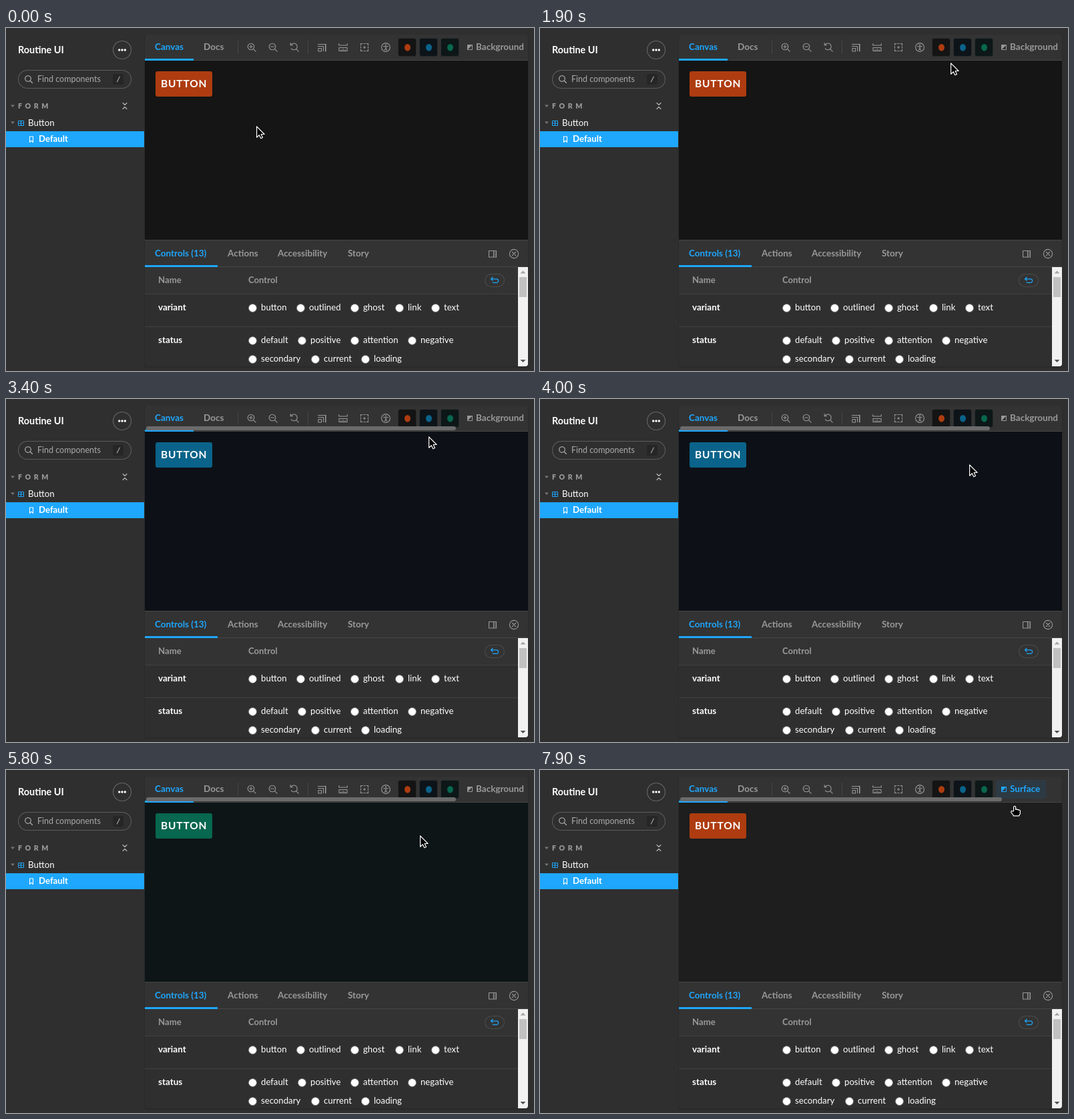
An HTML page that plays this animation: 791 px wide and 515 px high, repeating every 8000 ms.

```html
<!DOCTYPE html>
<html lang="en">
<head>
<meta charset="utf-8">
<title>Component workbench</title>
<style>
  html, body { margin: 0; width: 100%; height: 100%; overflow: hidden; background: #2f2f2f; }
  svg { display: block; width: 791px; height: 515px; }
  text { font: 13.2px Lato, "Open Sans", sans-serif; fill: #fff; white-space: pre; }
  .b { font-weight: 700; font-size: 13.5px; }
  .g { fill: #999; }
  .a { fill: #1ea7fd; }
  .i { fill: none; stroke: #999; stroke-width: 1.1; stroke-linecap: round; stroke-linejoin: round; }
  .ia { fill: none; stroke: #1ea7fd; stroke-width: 1.2; }
  .line { fill: #464646; }
  .cur { fill: #000; stroke: #fff; stroke-width: 1.2; stroke-linejoin: round; }
</style>
</head>
<body>
<svg viewBox="0 0 791 515">
  <rect width="791" height="515" fill="#2f2f2f"/>

  <!-- sidebar -->
  <text class="b" x="18" y="38" style="font-size:14.4px">Routine UI</text>
  <circle class="i" cx="174" cy="33" r="13.5" style="stroke:#666"/>
  <g fill="#fff"><circle cx="169.7" cy="33" r="1.7"/><circle cx="174" cy="33" r="1.7"/><circle cx="178.3" cy="33" r="1.7"/></g>
  <rect class="i" x="18.5" y="63.5" width="169" height="27" rx="13.5" style="stroke:#5c5c5c"/>
  <g class="i" style="stroke:#bbb"><circle cx="33" cy="76" r="4.3"/><path d="M36.2 79.2l3.3 3.3"/></g>
  <text x="47" y="81" style="font-size:12.5px;fill:#aaa">Find components</text>
  <rect x="160" y="69" width="16" height="16" rx="3" fill="#262626"/>
  <path class="i" d="M166.3 81l4-8" style="stroke:#aaa"/>
  <g fill="#777"><path d="M7 115.5h6l-3 3.5z"/><path d="M7 140.5h6l-3 3.5z"/></g>
  <text class="g" x="18" y="121" style="font-size:10.6px;font-weight:900;letter-spacing:4.6px">FORM</text>
  <path class="i" d="M175 112.5l3 3 3-3M175 121.5l3-3 3 3" style="stroke:#bbb"/>
  <path class="ia" d="M18.5 139.5h8v7h-8zM22.5 139.5v7M18.5 143h8" style="stroke-width:1"/>
  <text x="33" y="147">Button</text>
  <rect y="155" width="208" height="24" fill="#1ea7fd"/>
  <path class="i" d="M35.5 163h5v8.5l-2.5-2.3-2.5 2.3z" style="stroke:#fff"/>
  <text class="b" x="49" y="171" style="font-size:13.2px">Default</text>

  <!-- main panel -->
  <rect x="207" y="10" width="576" height="500" rx="4" fill="#2a2a2a"/>
  <rect x="208" y="10" width="574" height="498" rx="4" fill="#333"/>
  <rect class="line" x="208" y="48" width="574" height="1"/>
  <rect id="canvas" x="208" y="49" width="574" height="269"/>
  <rect class="line" x="208" y="318" width="574" height="1"/>
  <rect class="a" x="208" y="46" width="73" height="3"/>
  <text class="b a" x="223" y="33">Canvas</text>
  <text class="b g" x="296" y="33">Docs</text>
  <rect class="line" x="347" y="19" width="1" height="20"/>
  <rect class="line" x="452" y="19" width="1" height="20"/>
  <g class="i">
    <circle cx="367" cy="28" r="4.8"/><path d="M370.6 31.6l3.6 3.6M364.6 28h4.8M367 25.6v4.8"/>
    <circle cx="399" cy="28" r="4.8"/><path d="M402.6 31.6l3.6 3.6M396.6 28h4.8"/>
    <path d="M427.2 25.2a4.9 4.9 0 1 1 .2 5.6M434.8 31.6l3.4 3.6M426.2 22.6v3.2h3.2"/>
    <path d="M467.5 24.5h11v10M467.5 27.5h8v7M468 30.5h4.5v4.5h-4.5zM479 24v11"/>
    <path d="M498.8 23.5v2.5h12.4v-2.5M499 29.5h12v5h-12zM502 32.5v2M505 31.5v3M508 32.5v2"/>
    <path d="M531.5 26v-2.5h2.5M540 23.5h2.5v2.5M542.5 32v2.5h-2.5M534 34.5h-2.5v-2.5M536 23.5h2M536 34.5h2M531.5 28v2M542.5 28v2M535.5 29h3M537 27.5v3"/>
    <circle cx="569" cy="29" r="6.4"/><path d="M565.6 27.5l3.4.6 3.4-.6M569 28v2.6M567.3 33.2l1.7-2.6 1.7 2.6"/>
  </g>
  <circle cx="569" cy="25.5" r="1.1" fill="#999"/>
  <g id="swatches"></g>
  <rect id="hover" x="683" y="15" height="28" rx="4" fill="#2d3a44"/>
  <g id="mode">
    <path d="M691.5 25.5h7v7h-7z" fill="none" stroke="currentColor"/>
    <path d="M691 33v-8h8z" fill="currentColor"/>
    <text id="modeName" class="b" x="704" y="33" style="fill:currentColor"></text>
  </g>
  <rect id="bar" x="210" y="41" height="6" rx="3" fill="#6b6b6b"/>

  <rect id="button" x="224" y="65" width="85" height="38" rx="3"/>
  <text class="b" x="232" y="89.3" style="font-size:15.5px;letter-spacing:.8px">BUTTON</text>

  <!-- controls -->
  <text class="b a" x="223" y="343">Controls (13)</text>
  <text class="b g" x="332" y="343">Actions</text>
  <text class="b g" x="407" y="343">Accessibility</text>
  <text class="b g" x="512" y="343">Story</text>
  <g class="i">
    <path d="M723.5 334.5h11v9.5h-11zM730.5 334.5v9.5M732 336.7h1.2M732 339.2h1.2M732 341.7h1.2"/>
    <circle cx="761" cy="339" r="6.6"/><path d="M758.5 336.5l5 5M763.5 336.5l-5 5"/>
  </g>
  <rect class="line" x="208" y="358" width="574" height="1"/>
  <rect class="a" x="208" y="356" width="109" height="3"/>
  <path d="M208 400h559v108h-555a4 4 0 0 1-4-4z" fill="#2f2f2f"/>
  <rect class="line" x="208" y="399" width="559" height="1" style="fill:#414141"/>
  <rect class="line" x="208" y="448" width="559" height="1" style="fill:#414141"/>
  <text class="b g" x="228" y="383" style="font-size:13.2px">Name</text>
  <text class="b g" x="363" y="383" style="font-size:13.1px">Control</text>
  <rect class="i" x="717.5" y="369.5" width="29" height="19" rx="9.5" style="stroke:#4c4c4c"/>
  <path class="ia" d="M729.5 374l-3 2.8 3 2.8M726.8 376.8h8a2.8 2.8 0 0 1 0 5.6h-6"/>
  <text class="b" x="228" y="424">variant</text>
  <text class="b" x="228" y="473">status</text>
  <g id="radios"></g>

  <path d="M767 359h15v145a4 4 0 0 1-4 4h-11z" fill="#f1f1f1"/>
  <rect x="769" y="374" width="11" height="30" fill="#c1c1c1"/>
  <path d="M770.5 368.5h8l-4-4z" fill="#a3a3a3"/>
  <path d="M770.5 498h8l-4 4z" fill="#505050"/>

  <g id="cursor" class="cur">
    <path id="arrow" d="M.6.8v16.4l3.7-3.5 2.5 5 2.7-1.2-2.4-5h5z"/>
    <path id="hand" d="M-1.4 7.6V1.8a1.5 1.5 0 0 1 3 0v3.6c.5-.8 2-.7 2.4.3.7-.6 1.9-.3 2.2.6 1-.5 2.2.1 2.2 1.3v3.2c0 2-1.6 2.6-1.6 4H-1.6c-.2-2-3.8-4-3.8-6 0-1.3 1.6-1.7 2.4-.8z"/>
  </g>
</svg>
<script>
const $ = id => document.getElementById(id);
const LOOP = 8000, STEP = 100;

const themes = {
  orange: { fill: '#ae3c10', canvas: '#151515', swatch: '#141414', x: 588 },
  blue: { fill: '#0a638a', canvas: '#0d1117', swatch: '#0d1419', x: 620 },
  green: { fill: '#07674f', canvas: '#0d1517', swatch: '#0d1717', x: 652 }
};

$('swatches').innerHTML = Object.values(themes).map(({ fill, swatch, x }) =>
  `<rect x="${x - .5}" y="15.5" width="27" height="27" rx="3" fill="${swatch}" stroke="#292b2c"/>
   <ellipse cx="${x + 13.5}" cy="29.2" rx="4.5" ry="5.3" fill="${fill}"/>`).join('');

const radios = [
  [420, { button: 369, outlined: 441, ghost: 522, link: 589, text: 643 }],
  [469, { default: 369, positive: 443, attention: 522, negative: 608 }],
  [497, { secondary: 369, current: 463, loading: 538 }]
];
$('radios').innerHTML = radios.map(([y, row]) => Object.entries(row).map(([name, x]) =>
  `<circle cx="${x + .5}" cy="${y + .5}" r="6" fill="#fff" stroke="#767676"/>
   <text x="${x + 13}" y="${y + 4}">${name}</text>`).join('')).join('');

// Pointer path: time, x, y
const path = [
  [100, 375, 147], [500, 305, 100], [800, 256, 82], [900, 256, 82], [1000, 285, 80],
  [1100, 346, 82], [1400, 556, 73], [1500, 556, 73], [1900, 615, 52], [2300, 655, 42],
  [2700, 655, 42], [2800, 628, 43], [3100, 628, 24], [3200, 628, 24], [3500, 636, 72],
  [3800, 657, 105], [4000, 643, 98], [4100, 646, 86], [4400, 666, 32], [4700, 670, 18],
  [5300, 670, 18], [5600, 648, 84], [5800, 620, 98], [6000, 601, 76], [6200, 655, 52],
  [6500, 598, 22], [6700, 598, 22], [6900, 610, 52], [7100, 650, 56], [7300, 696, 40],
  [7500, 711, 30], [7700, 711, 30], [7900, 711, 54]
];

const clamp = v => Math.min(1, Math.max(0, v));
const lerp = (a, b, k) => a + (b - a) * k;

function pointer(t) {
  const n = path.findIndex(p => p[0] >= t);
  if (n <= 0) return path[0].slice(1);
  const [a, b] = [path[n - 1], path[n]];
  const k = (t - a[0]) / (b[0] - a[0]);
  return [lerp(a[1], b[1], k), lerp(a[2], b[2], k)];
}

function mix(a, b, k) {
  const rgb = h => [1, 3, 5].map(i => parseInt(h.slice(i, i + 2), 16));
  const to = rgb(b);
  return `rgb(${rgb(a).map((v, i) => Math.round(lerp(v, to[i], k)))})`;
}

function draw(time) {
  const t = Math.floor(time % LOOP / STEP) * STEP;
  const theme = themes[t >= 3300 && t < 5200 ? 'blue' : t >= 5200 && t < 6700 ? 'green' : 'orange'];
  const surface = t >= 7700, overMode = t >= 7300;
  const glow = clamp((t - 500) / 200) * clamp((1300 - t) / 200);

  $('canvas').setAttribute('fill', surface ? '#1e1e1e' : theme.canvas);
  $('button').setAttribute('fill', mix(theme.fill, '#d34a12', glow));

  $('modeName').textContent = surface ? 'Surface' : 'Background';
  $('mode').style.color = surface ? '#1ea7fd' : '#999';
  $('hover').setAttribute('width', overMode ? (surface ? 75 : 99) : 0);
  $('bar').setAttribute('width', surface ? 482 : 464);
  $('bar').style.opacity = clamp((t - 1900) / 200);

  const [x, y] = pointer(t);
  const onButton = x > 224 && x < 309 && y > 65 && y < 103;
  const onTools = x > 588 && y > 14 && y < 41;
  const hand = onButton || onTools || overMode;
  $('cursor').setAttribute('transform', `translate(${Math.round(x)} ${Math.round(y)})`);
  $('hand').style.display = hand ? '' : 'none';
  $('arrow').style.display = hand ? 'none' : '';
}

const start = performance.now();
function tick() {
  draw(performance.now() - start);
  requestAnimationFrame(tick);
}
tick();
</script>
</body>
</html>
```
